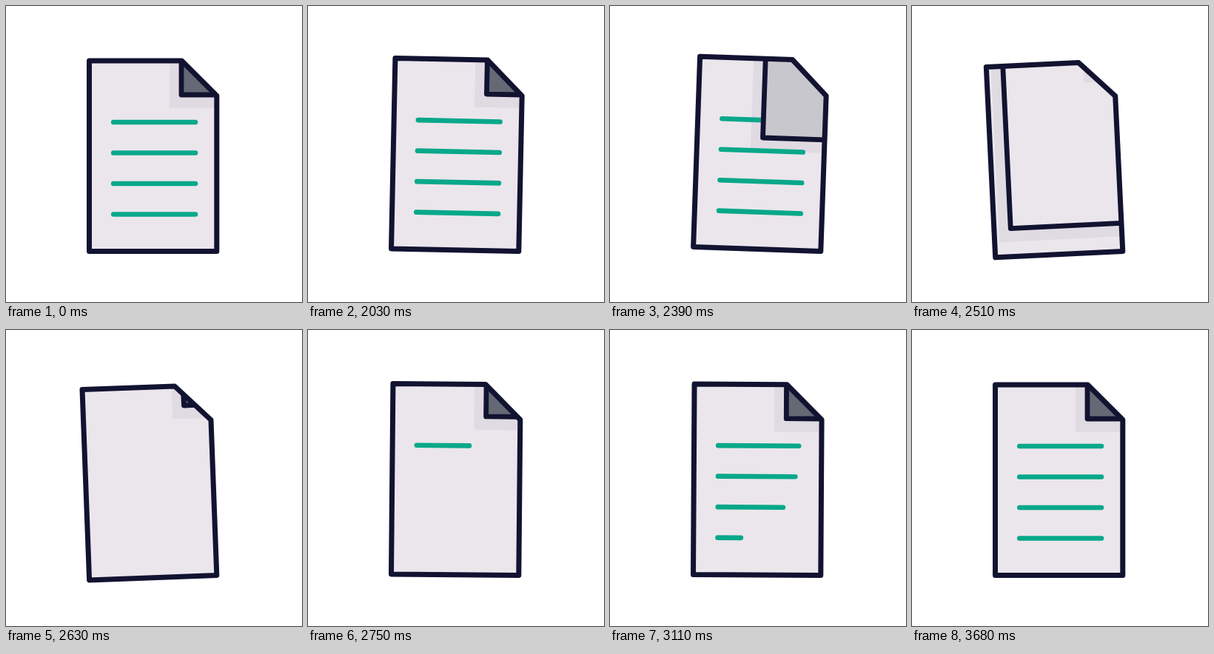
Recreate the animation shown at these times as an HTML page with a canvas. Size 400x400 px, loop 4430 ms.

```html
<!DOCTYPE html>
<html>
<head>
<meta charset="utf-8">
<style>
  html, body { margin: 0; height: 100%; overflow: hidden; background: #fff; }
  canvas { display: block; }
</style>
</head>
<body>
<canvas id="stage" width="400" height="400"></canvas>
<script>
const ctx = document.getElementById('stage').getContext('2d');
const LOOP = 4430, START = 2000, STEP = 30, LAST = 56;
const INK = '#121331', PAPER = '#ebe6ec', SHADE = '#e0dae2', GREEN = '#08a88a';
const GREY = [100, 105, 117], PAPER_RGB = [235, 230, 236];
const L = 112.5, T = 74, R = 284.8, B = 331.5;   // page edges
const CUT_X = 237.5, CUT_Y = 121.3;              // ends of the cut corner
const SLOPE = (CUT_Y - T) / (R - CUT_X);
const FOLD = [237, 120];                         // resting fold corner

const clamp = (v, a = 0, b = 1) => Math.min(b, Math.max(a, v));
const mix = (a, b, p) => a + (b - a) * p;
const mixAll = (a, b, p) => a.map((v, i) => mix(v, b[i], p));
const smooth = (n, a, b) => Math.sin(clamp((n - a) / (b - a)) * Math.PI / 2) ** 2;

// Damped swing, in degrees, around the bottom right corner
function swing(n) {
  if (n <= 8) return 7 * (1 - (1 - n / 8) ** 1.4);
  if (n <= 18) return mix(7, -3, smooth(n, 8, 18));
  if (n <= 29) return mix(-3, 2, smooth(n, 18, 29));
  return mix(2, 0, smooth(n, 29, 40));
}

function trace(points) {
  ctx.beginPath();
  points.forEach(([x, y]) => ctx.lineTo(x, y));
}

function tracePage() {
  trace([[L, T], [CUT_X, T], [R, CUT_Y], [R, B], [L, B]]);
  ctx.closePath();
}

function stroke(color, width) {
  ctx.strokeStyle = color;
  ctx.lineWidth = width;
  ctx.stroke();
}

function drawShade([x, y]) {
  ctx.fillStyle = SHADE;
  ctx.fillRect(x - 16, T, R - x + 16, y + 18 - T);
}

function drawFold([x, y], color) {
  const top = T + Math.max(0, x - CUT_X) * SLOPE;
  const right = Math.min(R, CUT_X + (y - T) / SLOPE);
  if (y <= top) return;
  trace([[x, top], [x, y], [right, y], [R, CUT_Y], [CUT_X, T]]);
  ctx.fillStyle = color;
  ctx.fill();
  trace([[x, top], [x, y], [right, y]]);
  stroke(INK, 6.8);
}

function drawLines(reach) {
  for (let i = 0; i < 4; i++) {
    const p = reach(i), y = 157 + i * 41.5;
    if (p <= 0) continue;
    trace([[145.2, y], [mix(145.2, 256, p), y]]);
    stroke(GREEN, 6.6);
  }
}

function draw(n) {
  ctx.clearRect(0, 0, 400, 400);
  ctx.save();
  ctx.lineCap = ctx.lineJoin = 'round';
  ctx.translate(R, B);
  ctx.rotate(swing(n) * Math.PI / 180);
  ctx.translate(-R, -B);

  ctx.save();
  tracePage();
  ctx.clip();
  ctx.fillStyle = PAPER;
  ctx.fillRect(L, T, R - L, B - T);

  // The first sheet peels away until its fold reaches the far corner
  if (n <= 20) {
    const corner = mixAll(FOLD, [L, B], smooth(n, 9, 20.1));
    drawShade(corner);
    drawLines(() => 1);
    drawFold(corner, `rgb(${mixAll(GREY, PAPER_RGB, smooth(n, 9, 15))})`);
  }
  // The next sheet gets its own fold and writes its lines
  if (n > 15) {
    const corner = mixAll([261, 81], FOLD, smooth(n, 15, 27));
    drawShade(corner);
    drawLines(i => n >= LAST ? 1 : 1 - Math.exp((21 + 4.9 * i - n) / 3.9));
    drawFold(corner, `rgb(${GREY})`);
  }
  ctx.restore();

  tracePage();
  stroke(INK, 7);
  ctx.restore();
}

const origin = performance.now();
function tick() {
  const t = (performance.now() - origin) % LOOP;
  draw(clamp(Math.floor((t - START) / STEP), 0, LAST));
  requestAnimationFrame(tick);
}
tick();
</script>
</body>
</html>
```
